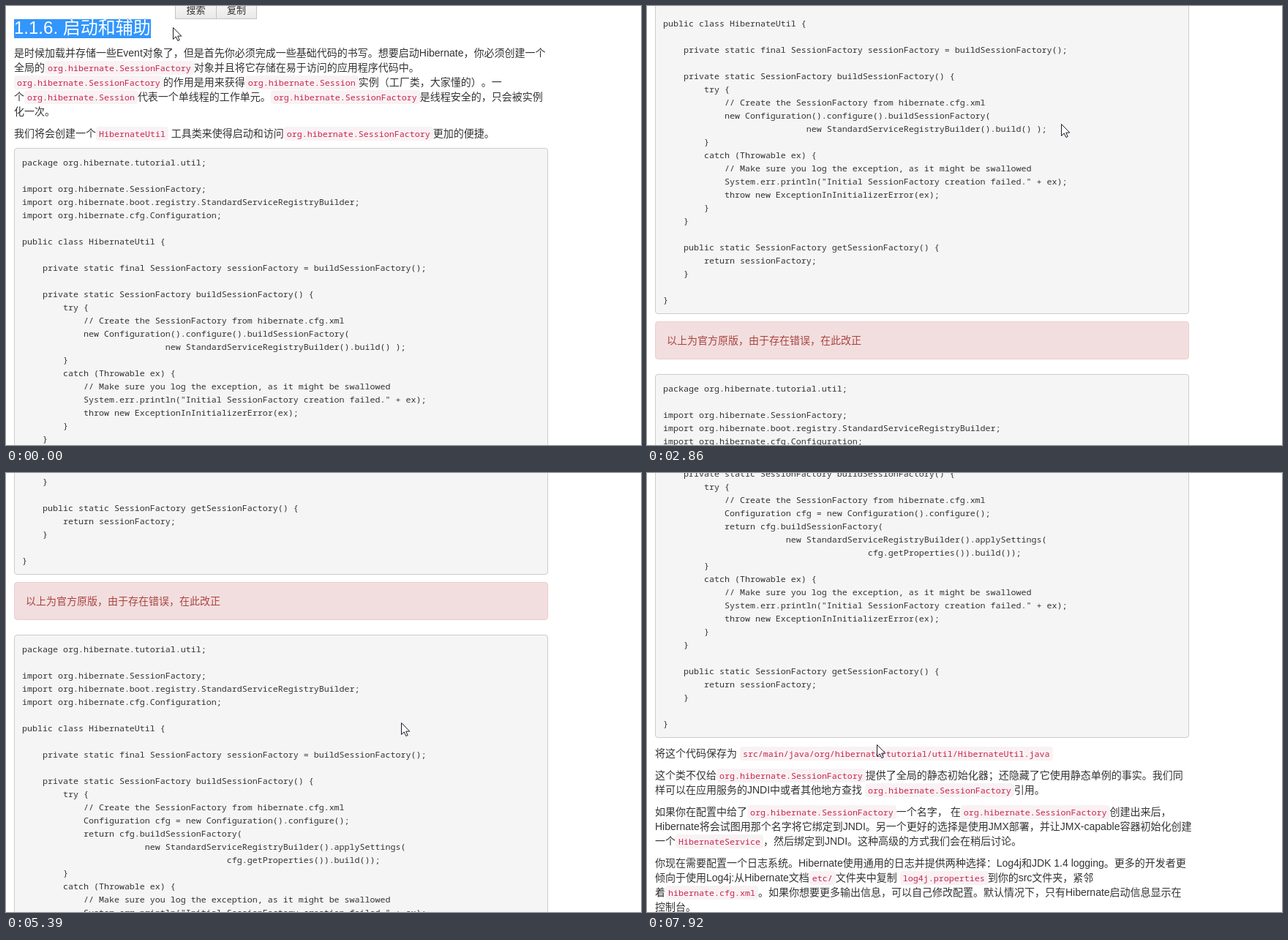
Recreate the animation shown at these times as an HTML page. Size 868 by 600 pixels, loop 8 s.

```html
<!DOCTYPE html>
<html lang="zh-CN">
<head>
<meta charset="utf-8">
<title>启动和辅助</title>
<style>
html, body { margin: 0; width: 100%; height: 100%; overflow: hidden; background: #fff; }
body { position: relative; font: 14px/20px "Liberation Sans", "Noto Sans CJK SC", "Noto Sans CJK", sans-serif;
  color: #333; text-spacing-trim: space-all; text-autospace: no-autospace; white-space: nowrap; }
#page { position: absolute; inset: 0; }
#page > * { position: absolute; left: 11px; margin: 0; box-sizing: border-box; }
h2 { top: 17px; padding-bottom: 1px; font-size: 24px; line-height: 26px; font-weight: 300; color: #4c3d7d; }
pre, .alert { width: 730px; border: 1px solid #ccc; border-radius: 4px; }
pre, code { font: 11.667px/18px "Noto Sans Mono", "DejaVu Sans Mono", monospace; }
pre { padding: 10px 10px 9px; background: #f5f5f5; }
code { padding: 2px 4px; line-height: 0; color: #c7254e; background: #f9f2f4; border-radius: 4px; }
.alert { padding: 15px; color: #a94442; background: #f2dede; border-color: #ebccd1; }
#page > .sel { color: #fff; background: #3296fd; border-color: #3296fd; }
#pop { position: absolute; display: flex; height: 24px; box-sizing: border-box; border: 1px solid #c4c4c4;
  background: linear-gradient(#f8f8f8, #e9e9e9); font-size: 13px; line-height: 22px; color: #333; }
#pop span { min-width: 55px; padding: 0 6px; box-sizing: border-box; text-align: center; }
#pop span + span { border-left: 1px solid #c4c4c4; }
#mouse { position: absolute; left: 0; top: 0; overflow: visible; }
</style>
</head>
<body>
<div id="page">
<h2 id="title">1.1.6. 启动和辅助</h2>
<p style="top:54px">是时候加载并存储一些Event对象了,但是首先你必须完成一些基础代码的书写。想要启动Hibernate,你必须创建一个<br>全局的<code>org.hibernate.SessionFactory</code>对象并且将它存储在易于访问的应用程序代码中。<br><code>org.hibernate.SessionFactory</code>的作用是用来获得<code>org.hibernate.Session</code>实例(工厂类,大家懂的)。一<br>个<code>org.hibernate.Session</code>代表一个单线程的工作单元。<code>org.hibernate.SessionFactory</code>是线程安全的,只会被实例<br>化一次。</p>
<p style="top:164px">我们将会创建一个<code>HibernateUtil</code> 工具类来使得启动和访问<code>org.hibernate.SessionFactory</code>更加的便捷。</p>
<pre id="before" style="top:194px"></pre>
<div id="note" class="alert" style="top:729px">以上为官方原版,由于存在错误,在此改正</div>
<pre id="after" style="top:801px"></pre>
<p style="top:1373px">将这个代码保存为 <code>src/main/java/org/hibernate/tutorial/util/HibernateUtil.java</code></p>
<p style="top:1403px">这个类不仅给<code>org.hibernate.SessionFactory</code>提供了全局的静态初始化器;还隐藏了它使用静态单例的事实。我们同<br>样可以在应用服务的JNDI中或者其他地方查找 <code>org.hibernate.SessionFactory</code>引用。</p>
<p style="top:1453px">如果你在配置中给了<code>org.hibernate.SessionFactory</code>一个名字, 在<code>org.hibernate.SessionFactory</code>创建出来后,<br>Hibernate将会试图用那个名字将它绑定到JNDI。另一个更好的选择是使用JMX部署,并让JMX-capable容器初始化创建<br>一个<code>HibernateService</code>,然后绑定到JNDI。这种高级的方式我们会在稍后讨论。</p>
<p style="top:1523px">你现在需要配置一个日志系统。Hibernate使用通用的日志并提供两种选择:Log4j和JDK 1.4 logging。更多的开发者更<br>倾向于使用Log4j:从Hibernate文档<code>etc/</code>文件夹中复制 <code>log4j.properties</code>到你的src文件夹,紧邻<br>着<code>hibernate.cfg.xml</code>。如果你想要更多输出信息,可以自己修改配置。默认情况下,只有Hibernate启动信息显示在<br>控制台。</p>
</div>
<div id="pop"></div>
<svg id="mouse" width="13" height="20"><path d="M.5 .5v16l3.7-3.6 2.6 5.6 2.4-1-2.5-5.4h5.1z" fill="#fff" stroke="#1c1c28"/></svg>
<script>
const $ = id => document.getElementById(id);
const STEP = 110, LOOP = 8000;

// Chinese prose takes full-width punctuation; a colon after a Latin word stays narrow
for (const el of document.querySelectorAll('p, .alert'))
  for (const node of el.childNodes)
    if (node.nodeType === Node.TEXT_NODE)
      node.data = node.data.replace(/[,;()]|(?<!\w):/g, c => String.fromCharCode(c.charCodeAt(0) + 0xfee0));

const listing = body => `package org.hibernate.tutorial.util;

import org.hibernate.SessionFactory;
import org.hibernate.boot.registry.StandardServiceRegistryBuilder;
import org.hibernate.cfg.Configuration;

public class HibernateUtil {

    private static final SessionFactory sessionFactory = buildSessionFactory();

    private static SessionFactory buildSessionFactory() {
        try {
            // Create the SessionFactory from hibernate.cfg.xml
${body}
        }
        catch (Throwable ex) {
            // Make sure you log the exception, as it might be swallowed
            System.err.println("Initial SessionFactory creation failed." + ex);
            throw new ExceptionInInitializerError(ex);
        }
    }

    public static SessionFactory getSessionFactory() {
        return sessionFactory;
    }

}`;
$('before').textContent = listing(`            new Configuration().configure().buildSessionFactory(
                            new StandardServiceRegistryBuilder().build() );`);
$('after').textContent = listing(`            Configuration cfg = new Configuration().configure();
            return cfg.buildSessionFactory(
                        new StandardServiceRegistryBuilder().applySettings(
                                        cfg.getProperties()).build());`);

const within = (t, from, to) => t >= from && t < to;
const ease = (t, from, to) => {
  const f = Math.min(1, Math.max(0, (t - from) / (to - from)));
  return f * f * (3 - 2 * f);
};

// Every wheel notch glides the page 100px
const notches = [2150, 2560, 2667, 3150, 5020, 5240, 5460, 5670, 7570, 7700];
const scrollAt = t => notches.reduce((sum, s) => sum + 100 * ease(t, s, s + 210), 0);

// Mouse moves: start time, end time, x, y reached
const moves = [
  [0, 550, 255, 74], [770, 1650, 768, 155], [1650, 1870, 707, 156], [2530, 2860, 566, 161],
  [2860, 3410, 386, 223], [3410, 3960, 27, 391], [4070, 4510, 357, 368], [4620, 4840, 253, 371],
  [4950, 5500, 573, 338], [5940, 6600, 36, 21], [6710, 7040, 407, 237], [7260, 7920, 314, 371]];
const mouseAt = t => moves.reduce(([x, y], [from, to, toX, toY]) => {
  const f = ease(t, from, to);
  return [x + (toX - x) * f, y + (toY - y) * f];
}, [228, 29]);

const popups = [
  { from: 0, to: 1320, x: 231, y: -6, labels: ['搜索', '复制'] },
  { from: 4510, to: 4730, x: 360, y: 322, labels: ['搜索', '复制'] },
  { from: 7040, to: 7370, x: 409, y: 191, labels: ['复制', '收藏到云盘'] }];

// A selection is a recoloured copy of the element, clipped to the chosen part
function selection(id) {
  const copy = $(id).cloneNode(true);
  copy.removeAttribute('id');
  copy.classList.add('sel');
  $(id).after(copy);
  return points => {
    copy.style.visibility = points ? 'visible' : 'hidden';
    if (points) copy.style.clipPath = `polygon(${points.map(p => p.map(v => v + 'px').join(' '))})`;
  };
}
const selTitle = selection('title'), selNote = selection('note'), selCode = selection('after');
const box = (l, t, r, b) => [[l, t], [r, t], [r, b], [l, b]];

function noteShape([x]) {
  return box(16, 16, 16 + 14 * Math.min(19, Math.round((x - 27) / 14)), 34);
}

function codeShape([x, y]) {
  const row = Math.max(0, Math.floor((y - 10) / 18)), top = 9 + 18 * row;
  const start = 25, end = 11 + 7 * Math.round((x - 22) / 7);
  if (!row) return box(start, 11, Math.max(start, end), 27);
  return [[start, 11], [720, 11], [720, top], [end, top], [end, top + 18], [11, top + 18], [11, 27], [start, 27]];
}

function draw(now) {
  const t = Math.floor(now % LOOP / STEP) * STEP;
  $('page').style.transform = `translateY(${-Math.round(scrollAt(t))}px)`;

  const [x, y] = mouseAt(t).map(Math.round);
  const overText = within(t, 3960, 4510) || within(t, 6600, 7370);
  $('mouse').style.visibility = overText ? 'hidden' : 'visible';
  $('mouse').style.transform = `translate(${x}px, ${y}px)`;

  selTitle(t < 1320 && box(0, 1, 187, 27));
  selNote(within(t, 4180, 4950) && noteShape(mouseAt(Math.min(t, 4510))));
  selCode(within(t, 6710, 7480) && codeShape(mouseAt(Math.min(t, 7040))));

  const pop = popups.find(p => within(t, p.from, p.to));
  $('pop').style.visibility = pop ? 'visible' : 'hidden';
  if (pop) {
    $('pop').style.transform = `translate(${pop.x}px, ${pop.y}px)`;
    $('pop').innerHTML = pop.labels.map(s => `<span>${s}</span>`).join('');
  }
}

const start = performance.now();
function tick() {
  draw(performance.now() - start);
  requestAnimationFrame(tick);
}
tick();
</script>
</body>
</html>
```
